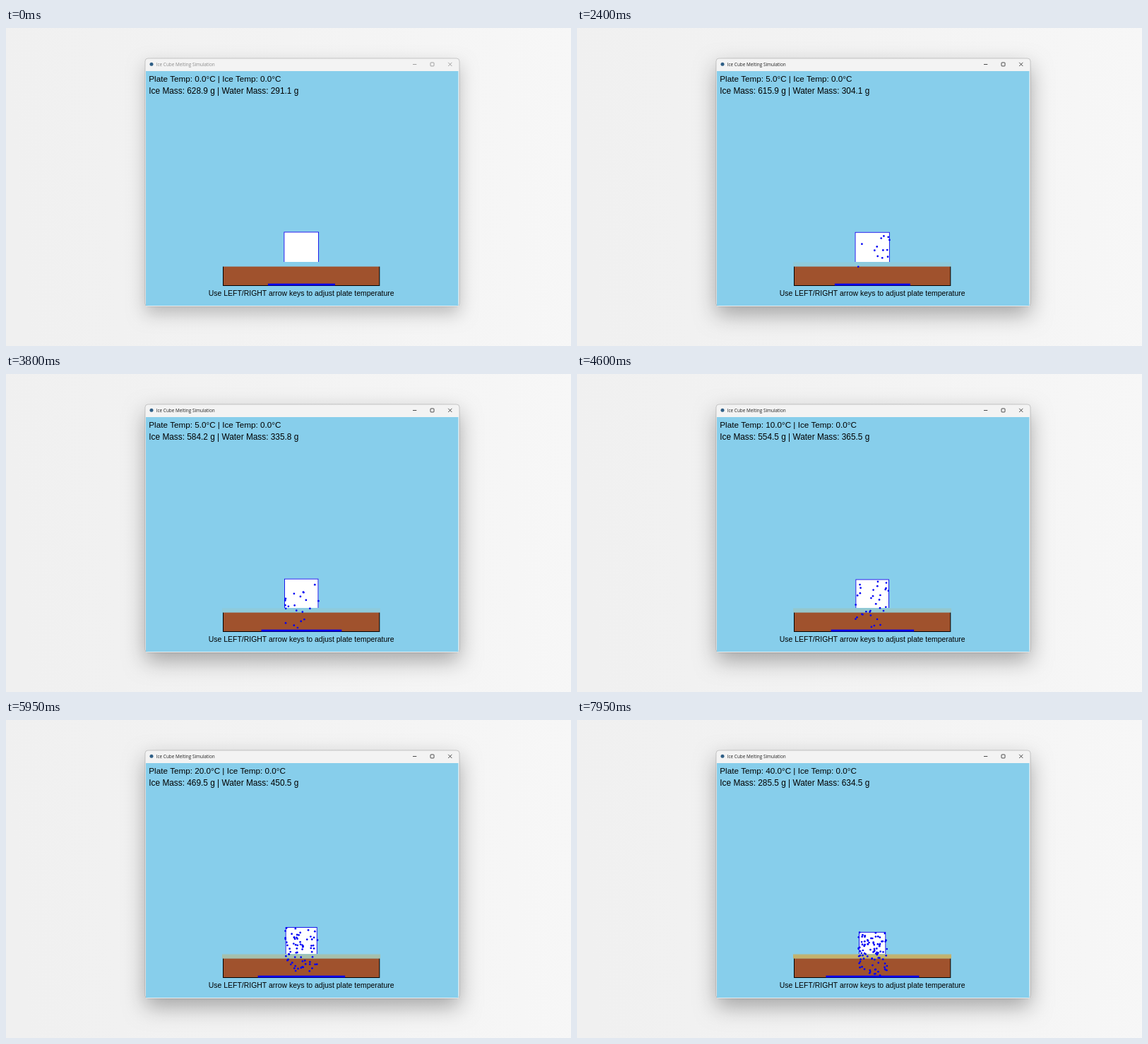
An HTML page with a canvas for the animation above (8 s loop, 800 by 450 pixels).

```html
<!DOCTYPE html>
<html lang="en">
<head>
<meta charset="utf-8">
<title>Ice Cube Melting Simulation</title>
<style>
html, body { margin: 0; width: 100%; height: 100%; overflow: hidden; background: #f3f3f3; }
canvas { display: block; width: 800px; height: 450px; }
</style>
</head>
<body>
<canvas id="stage" width="800" height="450"></canvas>
<script>
const ctx = document.getElementById('stage').getContext('2d');
const LOOP = 8000, STEP = 50, FOCUS_AT = 0.9;
const TOTAL_MASS = 920, CENTER = 418.2, FLOOR = 338;
const GRAVITY = 125, PUDDLE_Y = 361.5;

// time in s, plate temperature from then on, ice mass in g
const KEYS = [
  [0, 0, 628.9], [1.85, 5, 628.9], [2.4, 5, 615.9], [3.8, 5, 584.2],
  [4.05, 10, 578.6], [4.6, 10, 554.5], [5.05, 15, 534.5], [5.5, 20, 506],
  [5.95, 20, 469.5], [6.6, 25, 420.5], [6.85, 25, 398.4], [7.1, 30, 378],
  [7.4, 35, 350], [7.65, 40, 321.5], [7.95, 40, 285.5]
];

const lerp = (a, b, k) => a + (b - a) * k;

function rand(n) {
  const v = Math.sin(n * 127.1 + 311.7) * 43758.5453;
  return v - Math.floor(v);
}

function stateAt(t) {
  let i = 0;
  while (i < KEYS.length - 2 && KEYS[i + 1][0] <= t + 1e-6) i++;
  const [t0, temp, m0] = KEYS[i], [t1, , m1] = KEYS[i + 1];
  return { temp, mass: lerp(m0, m1, (t - t0) / (t1 - t0)) };
}

function timeOfMass(mass) {
  for (let i = 1; i < KEYS.length; i++) {
    const [t0, , m0] = KEYS[i - 1], [t1, , m1] = KEYS[i];
    if (mass >= m1 && mass < m0) return lerp(t0, t1, (m0 - mass) / (m0 - m1));
  }
  return Infinity;
}

const sideOf = mass => 5.78 * Math.cbrt(mass);

// one drop for each gram of melted ice
const drops = [];
for (let i = 1; i < 343; i++) {
  const mass = KEYS[0][2] - i, side = sideOf(mass);
  drops.push({
    born: timeOfMass(mass),
    x: CENTER + (rand(i) - 0.5) * (side + 1),
    y: FLOOR - side + rand(i + 500) * (side - 7)
  });
}

function rect(x, y, w, h, fill) {
  ctx.fillStyle = fill;
  ctx.fillRect(x, y, w, h);
}

function text(str, x, y, font, color, align = 'left') {
  ctx.font = font;
  ctx.fillStyle = color;
  ctx.textAlign = align;
  ctx.fillText(str, x, y);
}

function disc(x, y, r, fill) {
  ctx.fillStyle = fill;
  ctx.beginPath();
  ctx.arc(x, y, r, 0, Math.PI * 2);
  ctx.fill();
}

function drawDesktop() {
  const g = ctx.createLinearGradient(0, 60, 800, 0);
  g.addColorStop(0, '#f0f0f0');
  g.addColorStop(0.5, '#f3f3f3');
  g.addColorStop(1, '#f7f7f7');
  rect(0, 0, 800, 450, g);
}

function drawWindow(active) {
  ctx.save();
  ctx.shadowColor = active ? 'rgba(0,0,0,.32)' : 'rgba(0,0,0,.24)';
  ctx.shadowBlur = active ? 30 : 24;
  ctx.shadowOffsetY = active ? 12 : 10;
  ctx.fillStyle = '#f3f3f3';
  ctx.beginPath();
  ctx.roundRect(197, 43, 445, 351, 4);
  ctx.fill();
  ctx.restore();
  ctx.strokeStyle = 'rgba(0,0,0,.22)';
  ctx.lineWidth = 0.8;
  ctx.stroke();

  const ink = active ? '#222' : '#8c8c8c';
  disc(206, 51.3, 2.5, '#2f5f86');
  text('Ice Cube Melting Simulation', 212.8, 54, '6.4px "Open Sans", sans-serif', ink);
  ctx.strokeStyle = ink;
  ctx.lineWidth = 0.8;
  ctx.beginPath();
  ctx.moveTo(576, 51.5);
  ctx.lineTo(581.3, 51.5);
  ctx.moveTo(626.2, 48.8);
  ctx.lineTo(631.4, 54);
  ctx.moveTo(631.4, 48.8);
  ctx.lineTo(626.2, 54);
  ctx.stroke();
  ctx.beginPath();
  ctx.roundRect(601, 48.9, 5, 5, 0.8);
  ctx.stroke();

  rect(198, 61, 443, 332.5, '#fff');
  rect(198, 61, 442.5, 332, '#87ceeb');
}

function drawIce(mass) {
  const side = sideOf(mass), x = CENTER - side / 2;
  rect(x, FLOOR - side, side, side, '#fff');
  ctx.strokeStyle = '#0000e8';
  ctx.lineWidth = 0.9;
  ctx.strokeRect(x + 0.4, FLOOR - side + 0.4, side - 0.8, side - 0.8);
}

function drawPlate() {
  rect(307.4, 337, 221.5, 27.5, '#a0522d');
  ctx.strokeStyle = '#000';
  ctx.lineWidth = 1;
  ctx.strokeRect(307.5, 336.5, 221.3, 28);
}

function drawHeat(temp) {
  const k = temp / 40;
  const mix = (a, b) => Math.round(lerp(a, b, k));
  rect(306, 331, 224, 6.3, '#87ceeb');
  ctx.globalAlpha = 0.55;
  const color = `rgb(${mix(135, 196)},${mix(206, 178)},${mix(235, 108)})`;
  rect(306, 331, 224, 6.3, color);
  ctx.globalAlpha = 1;
  rect(306, 332.4, 224, 4.9, color);
}

function drawWater(t) {
  const w = 95 + 5.2 * t - 0.07 * t * t;
  rect(CENTER + 0.2 - w / 2, 361.7, w, 2.8, '#0000f0');
  for (const d of drops) {
    const age = t - d.born;
    if (age < 0) continue;
    const y = d.y + GRAVITY * age * age / 2;
    if (y < PUDDLE_Y) disc(d.x, y, 1.35, '#0000f5');
  }
}

function drawLabels(temp, mass) {
  const font = size => `${size}px "Liberation Sans", Arial, sans-serif`;
  const water = TOTAL_MASS - mass;
  text(`Plate Temp: ${temp.toFixed(1)}°C | Ice Temp: 0.0°C`, 202.3, 76.4, font(11.7), '#000');
  text(`Ice Mass: ${mass.toFixed(1)} g | Water Mass: ${water.toFixed(1)} g`, 202.3, 93, font(11.85), '#000');
  text('Use LEFT/RIGHT arrow keys to adjust plate temperature',
    CENTER, 379.2, font(10.45), '#000', 'center');
}

function draw(now) {
  const t = Math.floor((now % LOOP) / STEP) * STEP / 1000;
  const { temp, mass } = stateAt(t);
  drawDesktop();
  drawWindow(t >= FOCUS_AT);
  drawIce(mass);
  drawPlate();
  drawHeat(temp);
  drawWater(t);
  drawLabels(temp, mass);
}

function tick() {
  draw(performance.now());
  requestAnimationFrame(tick);
}
tick();
</script>
</body>
</html>
```
